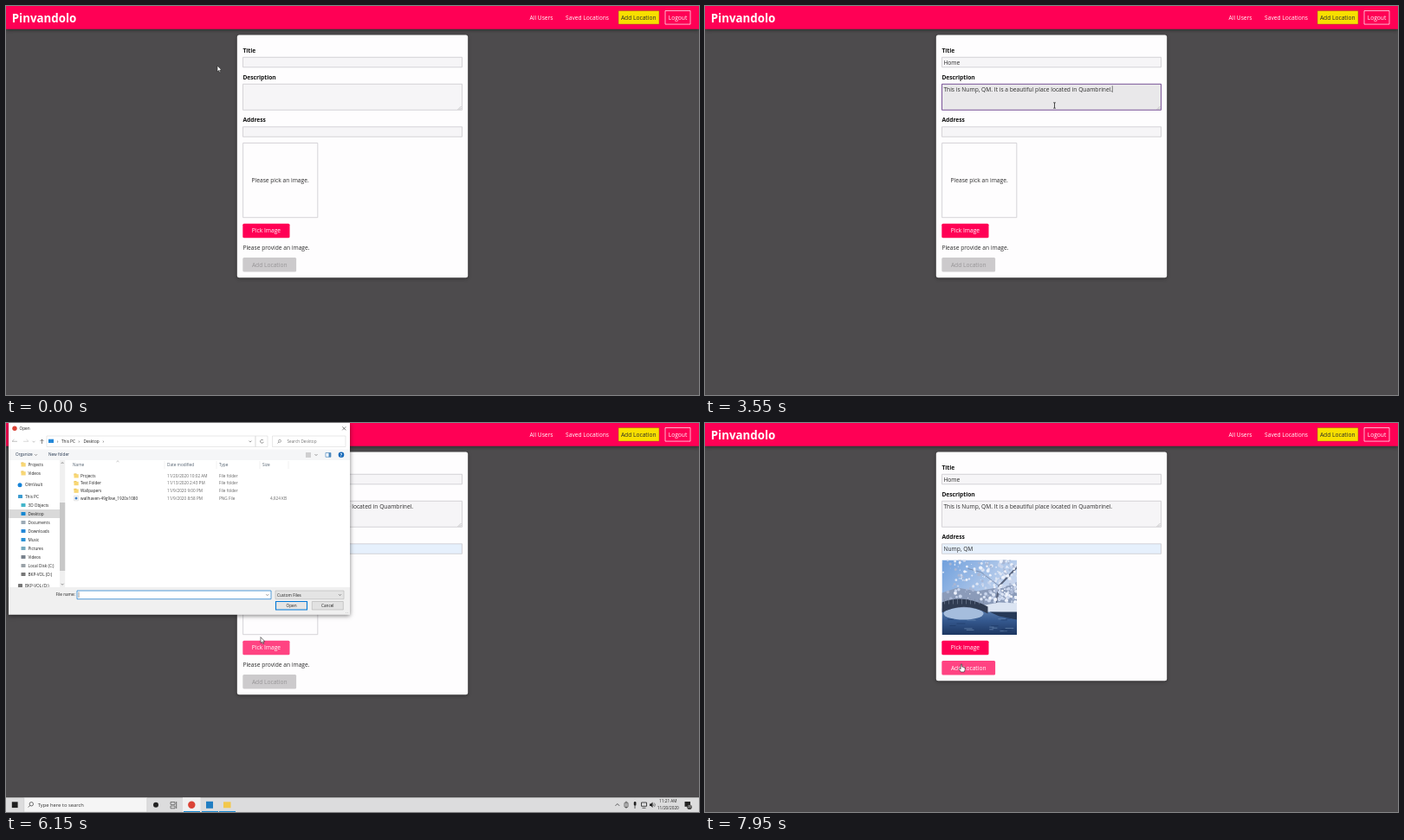
An HTML page with a canvas for the animation above (8000 ms loop, 800 by 450 pixels).

```html
<!DOCTYPE html>
<html lang="en">
<head>
<meta charset="utf-8">
<title>Add location form</title>
<style>
html, body { margin: 0; width: 100%; height: 100%; overflow: hidden; background: #4d4b4d; }
canvas { display: block; width: 100vw; height: 100vh; }
</style>
</head>
<body>
<canvas id="stage" width="800" height="450"></canvas>
<script>
const ctx = document.getElementById('stage').getContext('2d');
const LOOP = 8000, PINK = '#ff0055', HOVER = '#ff4382', INK = '#2b2b2b';
const PLACE = 'Nump, QM';
const STORY = `This is ${PLACE}. It is a beautiful place located in Quambrinel.`;

// Moments of the scene, in ms
const AT = {
  titleFocus: 850, suggest: 1050, storyFocus: 2700, placeFocus: 4300, autofill: 4600,
  pick: 5550, taskbar: 5700, open: 5850, loaded: 6050, rowHover: 6550, rowSelect: 6700,
  close: 7250, closed: 7400, addHover: 7900
};

// Pointer path: time, x, y
const PATH = [
  [50, 244, 69], [650, 329.5, 63], [2200, 329.5, 63], [2550, 403.5, 115], [4000, 403.5, 115],
  [4280, 366, 146], [4520, 366, 146], [4700, 353.5, 163], [4850, 353.5, 163], [5400, 304, 261],
  [6080, 304, 261], [6500, 172.5, 85.5], [7400, 172.5, 85.5], [7850, 296, 279]
];
const FIELDS = { title: [273, 59, 254, 12.5], story: [273, 90, 254, 31], place: [273, 139.5, 254, 12.5] };

const clamp = v => Math.max(0, Math.min(1, v));
const progress = (t, a, b) => clamp((t - a) / (b - a));
const ease = p => p * p * (3 - 2 * p);
const mix = (a, b, p) => a + (b - a) * p;
const inside = ([x, y, w, h], p) => p.x >= x && p.x <= x + w && p.y >= y && p.y <= y + h;

function text(str, x, y, size = 6.67, color = INK, align = 'left', weight = 400) {
  ctx.font = `${weight} ${size}px "Open Sans", sans-serif`;
  ctx.textAlign = align;
  ctx.fillStyle = color;
  ctx.fillText(str, x, y + size * 0.36);
}
function rect(x, y, w, h, fill, stroke, radius = 0, line = 0.8) {
  ctx.beginPath();
  ctx.roundRect(x, y, w, h, radius);
  if (fill) { ctx.fillStyle = fill; ctx.fill(); }
  if (stroke) { ctx.strokeStyle = stroke; ctx.lineWidth = line; ctx.stroke(); }
}
function dot(x, y, r, fill) {
  ctx.beginPath();
  ctx.arc(x, y, r, 0, 7);
  ctx.fillStyle = fill;
  ctx.fill();
}
function line(points, color, width = 0.7) {
  ctx.beginPath();
  points.forEach(([x, y]) => ctx.lineTo(x, y));
  ctx.strokeStyle = color;
  ctx.lineWidth = width;
  ctx.stroke();
}
function shape(points, fill) {
  ctx.beginPath();
  points.forEach(([x, y]) => ctx.lineTo(x, y));
  ctx.closePath();
  ctx.fillStyle = fill;
  ctx.fill();
}
const chevron = (x, y, color = '#555') => line([[x - 1.5, y - 0.7], [x, y + 0.8], [x + 1.5, y - 0.7]], color, 0.6);
function withShadow(blur, offset, color, draw) {
  ctx.save();
  ctx.shadowBlur = blur;
  ctx.shadowOffsetY = offset;
  ctx.shadowColor = color;
  draw();
  ctx.restore();
}

function pointerAt(t) {
  let i = PATH.findIndex(k => k[0] > t);
  if (i === 0) return { x: PATH[0][1], y: PATH[0][2] };
  if (i < 0) i = PATH.length - 1;
  const [t0, x0, y0] = PATH[i - 1], [t1, x1, y1] = PATH[i];
  const p = ease(progress(t, t0, t1));
  return { x: mix(x0, x1, p), y: mix(y0, y1, p) };
}

function header() {
  withShadow(4, 1, 'rgba(0,0,0,.45)', () => rect(0, 0, 800, 26.7, PINK));
  text('Pinvandolo', 6.7, 14, 13.33, '#fff', 'left', 700);
  text('All Users', 618, 13.5, 6.67, '#fff', 'center');
  text('Saved Locations', 671, 13.5, 6.67, '#fff', 'center');
  rect(707, 5.5, 47, 15.6, '#f8df00', '#a34a1c', 0, 0.5);
  text('Add Location', 730.2, 13.5, 6.67, '#292929', 'center');
  rect(761, 5.5, 29, 15.6, null, '#fff', 0, 0.7);
  text('Logout', 775.5, 13.5, 6.67, '#fff', 'center');
}

function field(box, value, focused, lastChange, t, filled) {
  const [x, y, w, h] = box;
  const fill = filled ? '#e6f0fc' : focused ? '#e9e8ea' : '#f6f5f7';
  rect(x + 0.5, y + 0.3, w - 1, h - 1, fill, focused ? '#5b2b80' : '#ccc9ce');
  text(value, x + 2.4, y + 6.2);
  if (focused && (t - lastChange) % 1000 < 500) {
    const end = x + 2.6 + ctx.measureText(value).width;
    line([[end, y + 2.3], [end, y + 10]], '#333', 0.6);
  }
}

function button(label, y, w, fill, color = '#fff') {
  rect(273.3, y, w, 16.5, fill, null, 1.5);
  text(label, 273.3 + w / 2, y + 8.3, 6.67, color, 'center');
}

function photo() {
  ctx.save();
  ctx.beginPath();
  ctx.rect(273.5, 158.5, 86.5, 86.5);
  ctx.clip();
  ctx.translate(273.5, 158.5);
  const sky = ctx.createLinearGradient(0, 0, 60, 50);
  sky.addColorStop(0, '#6f9fdc');
  sky.addColorStop(1, '#c5d5ee');
  rect(0, 0, 87, 60, sky);
  shape([[0, 38], [18, 32], [40, 36], [87, 28], [87, 60], [0, 60]], '#8b9bb9');
  line([[87, 8], [66, 30], [61, 58]], '#59647d', 2);
  line([[66, 30], [45, 14], [30, 10]], '#7785a3', 0.8);
  let seed = 7;
  const random = () => (seed = seed * 16807 % 2147483647) / 2147483647;
  for (let i = 0; i < 240; i++) {
    const reach = Math.sqrt(random());
    const shade = ['#eef2fb', '#c9d5ec', '#a9b7d4', '#dde5f4'][i % 4];
    dot(87 - (1 - reach) * 90 + random() * 14 - 9, random() * 49, 0.5 + random() * 1.7, shade);
  }
  const water = ctx.createLinearGradient(0, 56, 0, 87);
  water.addColorStop(0, '#5f82b1');
  water.addColorStop(0.45, '#35598f');
  water.addColorStop(1, '#1c355f');
  rect(0, 56, 87, 31, water);
  shape([[45, 53], [66, 49], [87, 50], [87, 61], [52, 60]], '#dbe4f2');
  shape([[55, 60], [87, 60], [87, 69], [66, 65]], '#263957');
  ctx.beginPath();
  ctx.ellipse(25, 62, 23, 7, 0, 0, 7);
  ctx.fillStyle = '#a5bddd';
  ctx.fill();
  ctx.beginPath();
  ctx.moveTo(0, 49);
  ctx.quadraticCurveTo(25, 39, 53, 54);
  ctx.lineTo(53, 62);
  ctx.quadraticCurveTo(26, 47, 0, 61);
  ctx.fillStyle = '#303c52';
  ctx.fill();
  for (let x = 3; x < 50; x += 5) line([[x, 45], [x, 51]], '#79869d', 0.6);
  for (let i = 0; i < 18; i++) {
    const x = random() * 78, y = 67 + random() * 18;
    line([[x, y], [x + 4 + random() * 7, y]], i % 2 ? '#7895bd' : '#1d3864', 0.6);
  }
  ctx.restore();
}

function suggestions(items) {
  withShadow(3, 1, 'rgba(0,0,0,.4)', () => rect(273.3, 71.8, 80, 6.5 + items.length * 15, '#fff'));
  items.forEach((item, i) => text(item, 278.3, 82.8 + i * 15, 5));
}

function form(t, pointer) {
  const hasImage = t >= AT.closed;
  withShadow(4, 1, 'rgba(0,0,0,.4)', () =>
    rect(266.8, 33.6, 266.4, hasImage ? 264.6 : 280.6, '#fefdfe', null, 2.5));
  text('Title', 273.4, 51.2, 6.67, '#111', 'left', 700);
  text('Description', 273.4, 82.6, 6.67, '#111', 'left', 700);
  text('Address', 273.4, 132, 6.67, '#111', 'left', 700);

  const titleKeys = [1400, 1650, 1750, 1850].filter(k => t >= k);
  field(FIELDS.title, 'Home'.slice(0, titleKeys.length), t >= AT.titleFocus && t < AT.storyFocus,
    titleKeys.at(-1) ?? AT.titleFocus, t);

  const storyLength = Math.floor(7 * progress(t, 2750, 3000) + (STORY.length - 7) * progress(t, 3150, 3550));
  field(FIELDS.story, STORY.slice(0, storyLength), t >= AT.storyFocus && t < AT.placeFocus,
    Math.min(t, 3550), t);
  for (const d of [2, 4]) line([[525.5 - d, 120], [525.5, 120 - d]], '#999', 0.5);

  const placeLength = Math.floor(PLACE.length * progress(t, 4350, AT.autofill));
  field(FIELDS.place, PLACE.slice(0, placeLength), t >= AT.placeFocus && t < AT.pick,
    Math.min(t, AT.autofill), t, t >= AT.autofill);

  if (hasImage) photo();
  else {
    rect(273.6, 158.5, 86.2, 86.2, null, '#ccc9ce');
    text('Please pick an image.', 316.6, 202, 6.67, INK, 'center');
    text('Please provide an image.', 273.4, 279.8);
  }
  const overPick = inside([273, 251.5, 54, 16.5], pointer);
  const picking = t >= AT.pick && t < AT.closed;
  button('Pick Image', 251.7, 54.2, overPick || picking ? HOVER : PINK);
  if (hasImage) button('Add Location', 275.1, 61.8, t >= AT.addHover ? HOVER : PINK);
  else button('Add Location', 291, 61.8, '#cccacc', '#979597');

  if (t >= AT.suggest && t < AT.storyFocus) {
    suggestions(t < 1400
      ? ['Home', 'Apples', '123', 'Harrow Crest Building', 'Banana', 'Test']
      : ['Home', 'Home 2']);
  }
}

const small = (str, x, y, color = '#222', align) => text(str, x, y, 4.7, color, align);
function folder(x, y) {
  rect(x - 2.5, y - 2.5, 3, 2, '#e5b740');
  rect(x - 2.5, y - 1.8, 5.2, 4.3, '#f8d775');
}

function sidebar() {
  ctx.save();
  ctx.beginPath();
  ctx.rect(3, 43, 66, 147);
  ctx.clip();
  rect(3, 100, 59, 10, '#d9d9d9');
  const entries = [
    ['Projects', 48, 25.5, 'folder'], ['Videos', 58, 25.5, 'folder'],
    ['OlmVault', 71.8, 22, '#1683d8'], ['This PC', 85, 22, '#3b9bd0'],
    ['3D Objects', 95, 25.5, '#43b5ca'], ['Desktop', 105, 25.5, '#1688d1'],
    ['Documents', 115, 25.5, '#9caab5'], ['Downloads', 125, 25.5, '#2488d8'],
    ['Music', 135, 25.5, '#2b91d5'], ['Pictures', 145, 25.5, '#75aabf'],
    ['Videos', 155, 25.5, '#78818c'], ['Local Disk (C:)', 165, 25.5, '#9aa2a8'],
    ['BKP-VOL (D:)', 175, 25.5, '#777'], ['BKP-VOL (D:)', 188, 22, '#777']
  ];
  for (const [label, y, x, icon] of entries) {
    if (icon === 'folder') folder(x - 5.5, y);
    else if (label === 'OlmVault') dot(x - 6, y, 2.5, icon);
    else rect(x - 8, y - 2, 5, 4, icon, null, 0.6);
    small(label, x, y);
  }
  rect(62, 43, 6.2, 147, '#f0f0f0');
  rect(62, 92, 6.2, 79, '#c8c8c8');
  line([[63.7, 47], [65.1, 45.5], [66.5, 47]], '#555', 0.6);
  chevron(65.1, 186.5);
  ctx.restore();
}

function fileList(t) {
  [['Name', 77], ['Date modified', 186], ['Type', 246], ['Size', 296]].forEach(([s, x]) => small(s, x, 48.5, '#53616f'));
  [183, 243, 293, 326].forEach(x => line([[x, 44], [x, 53]], '#e2e2e2', 0.5));
  line([[127.5, 45], [129, 43.7], [130.5, 45]], '#888', 0.5);
  if (t >= AT.rowHover) {
    const selected = t >= AT.rowSelect;
    rect(76, 82.7, 249.5, 8.5, selected ? '#cce8ff' : '#e5f3ff', selected ? '#80bde8' : null, 0, 0.6);
  }
  const rows = [
    ['Projects', '11/20/2020 10:02 AM'], ['Test Folder', '11/13/2020 2:43 PM'],
    ['Wallpapers', '11/9/2020 9:00 PM'], ['wallhaven-49g9xw_1920x1080', '11/9/2020 8:58 PM']
  ];
  rows.forEach(([name, date], i) => {
    const y = 61 + i * 8.67, isFile = i === 3;
    if (isFile) {
      rect(78.7, y - 2.8, 4.6, 5.6, '#fff', '#bbb', 0, 0.4);
      dot(81, y, 1.5, '#3f7fc8');
    } else folder(81, y);
    small(name, 86, y);
    small(date, 186, y, '#666');
    small(isFile ? 'PNG File' : 'File folder', 246, y, '#666');
    if (isFile) small('4,924 KB', 324, y, '#666', 'right');
  });
}

function addressBar() {
  line([[13, 21.3], [7, 21.3], [9.5, 19]], '#aaa');
  line([[20, 21.3], [26, 21.3], [23.5, 19]], '#ccc');
  chevron(32, 21.5, '#999');
  line([[41.5, 24], [41.5, 19], [39.5, 21]], '#555');
  line([[41.5, 19], [43.5, 21]], '#555');
  rect(47, 15, 241, 12.5, '#fff', '#d9d9d9', 0, 0.6);
  rect(49, 18.7, 6, 4.3, '#2488d8');
  small('›', 59, 21.3);
  small('This PC', 64, 21.3);
  small('›', 83.5, 21.3);
  small('Desktop', 89.5, 21.3);
  small('›', 111.5, 21.3);
  chevron(282, 21.3);
  rect(288, 15, 14, 12.5, null, '#d9d9d9', 0, 0.6);
  ctx.beginPath();
  ctx.arc(295.5, 21.3, 1.9, 0.3, 5.6);
  ctx.strokeStyle = '#555';
  ctx.stroke();
  rect(307.5, 15, 84.5, 12.5, '#fff', '#d9d9d9', 0, 0.6);
  ctx.beginPath();
  ctx.arc(316, 20.8, 1.5, 0, 7);
  ctx.strokeStyle = '#777';
  ctx.stroke();
  line([[315, 22], [313.5, 23.5]], '#777');
  small('Search Desktop', 324.5, 21.3, '#777');
  small('Organize', 11, 36.8, '#24364e');
  chevron(34.5, 36.8);
  small('New folder', 49, 36.8, '#24364e');
  for (const y of [35, 37, 39]) line([[346, y], [352, y]], '#888', 0.7);
  chevron(358, 36.8);
}

function dialog(t) {
  const shown = progress(t, AT.open, AT.loaded) * (1 - progress(t, AT.close, AT.closed));
  if (!shown) return;
  const loaded = t >= AT.loaded, selected = t >= AT.rowSelect;
  const scale = mix(0.96, 1, shown);
  ctx.save();
  ctx.globalAlpha = shown;
  ctx.translate(200, 110.5);
  ctx.scale(scale, scale);
  ctx.translate(-200, -110.5);
  withShadow(5, 1, 'rgba(0,0,0,.5)', () => rect(3, 0, 394, 221.5, '#fff'));
  dot(10, 6.3, 2.7, '#db4437');
  small('Open', 15.5, 6.5);
  line([[388.3, 4.3], [392.3, 8.3]], '#333', 0.6);
  line([[392.3, 4.3], [388.3, 8.3]], '#333', 0.6);
  rect(3, 30.5, 394, 12.5, '#f5f6f7');
  if (loaded) addressBar();
  rect(369, 34.5, 6, 4.8, '#fff', '#4c88bd', 0, 0.7);
  rect(372.5, 34.5, 2.5, 4.8, '#4c88bd');
  dot(387, 36.8, 3.3, '#1669b8');
  text('?', 387, 36.8, 5, '#fff', 'center', 700);
  sidebar();
  fileList(t);

  rect(3, 190, 394, 31.5, '#f0f0f0');
  small('File name:', 57.5, 198.8);
  rect(82, 194, 224, 9.7, '#fff', '#2a83cf', 0, 0.8);
  if (selected) small('wallhaven-49g9xw_1920x1080', 83.8, 198.9);
  else line([[84, 195.5], [84, 202]], '#333', 0.5);
  chevron(301.8, 198.8);
  rect(311, 194, 79, 9.7, '#e4e4e4', '#b5b5b5', 0, 0.6);
  small('Custom Files', 313, 198.9);
  chevron(385.5, 198.8);
  rect(311.5, 206.5, 36, 9.5, '#e5e5e5', '#0078d7', 0, 1.1);
  small('Open', 329.5, 211.4, '#222', 'center');
  rect(353.3, 206.5, 36, 9.5, loaded ? '#e2e2e2' : '#f8f8f8', loaded ? '#b0b0b0' : null, 0, 0.6);
  if (loaded) small('Cancel', 371.3, 211.4, '#222', 'center');
  for (const d of [1.5, 3.5]) dot(396 - d, 219.5, 0.4, '#aaa');
  ctx.restore();
}

function taskbar() {
  rect(0, 433.3, 800, 16.7, '#dcdcdd');
  rect(6.8, 438.3, 6.8, 6.8, '#1f1f1f');
  rect(20.8, 433.5, 142, 16.5, '#f5f5f5', '#c5c5c5', 0, 0.5);
  ctx.beginPath();
  ctx.arc(29.3, 440.8, 2.2, 0, 7);
  ctx.strokeStyle = '#333';
  ctx.lineWidth = 0.7;
  ctx.stroke();
  line([[27.7, 442.4], [25.7, 444.5]], '#333');
  text('Type here to search', 36.7, 441.8, 5.8, '#333');
  dot(173, 441.8, 3, '#222');
  for (const y of [438.5, 443]) rect(190, y, 5, 2.8, null, '#333', 0, 0.6);
  line([[196.7, 438], [196.7, 446]], '#333', 0.7);
  rect(204, 433.3, 20.5, 16.7, '#f0f0f0');
  dot(214.3, 441.8, 4.2, '#db4437');
  rect(231, 437.8, 8, 8, '#207dc2');
  rect(251, 438.3, 8.5, 7, '#f2c84b');
  for (const x of [204, 225, 245]) rect(x + 1, 449, 19, 1, '#1688d1');

  line([[703.5, 442.8], [705.8, 440.5], [708.1, 442.8]], '#222');
  rect(714, 439, 4, 5.5, null, '#333', 1, 0.7);
  line([[716, 437.5], [716, 446]], '#333', 0.6);
  rect(724.8, 438, 2.6, 4.8, '#222', null, 1.2);
  line([[726, 443], [726, 446]], '#222');
  rect(733.5, 439, 6, 4.3, null, '#222');
  line([[734.5, 445.3], [738.5, 445.3]], '#222');
  shape([[743, 440.5], [744.5, 440.5], [746.5, 438.5], [746.5, 445], [744.5, 443], [743, 443]], '#222');
  for (const r of [1.5, 3]) {
    ctx.beginPath();
    ctx.arc(746.3, 441.8, r, -0.9, 0.9);
    ctx.strokeStyle = '#222';
    ctx.lineWidth = 0.5;
    ctx.stroke();
  }
  small('11:21 AM', 764.3, 437.8, '#222', 'center');
  small('11/20/2020', 764.3, 445.6, '#222', 'center');
  rect(783.5, 438, 6.5, 5.8, '#222');
  dot(789, 444.3, 2.8, '#444');
  text('20', 789, 444.3, 3, '#fff', 'center');
}

function cursor(t, pointer) {
  const { x, y } = pointer;
  const dialogOpen = t >= AT.loaded && t < AT.closed;
  const overField = !dialogOpen && Object.values(FIELDS).some(box => inside(box, pointer));
  const overButton = !dialogOpen && (inside([273, 251.5, 54, 16.5], pointer) ||
    (t >= AT.closed && inside([273, 275, 62, 17], pointer)));
  ctx.save();
  ctx.translate(x, y);
  if (overField) {
    line([[0, -3], [0, 3]], '#222', 0.8);
    for (const end of [-3.2, 3.2]) line([[-1.4, end], [1.4, end]], '#222', 0.7);
  } else {
    const outline = overButton
      ? [[-0.7, 0], [0.6, 0], [0.8, 3], [4, 3.8], [4.2, 6.5], [3.2, 9], [-0.7, 9], [-3, 5.4], [-2.2, 4.6], [-0.8, 5.6]]
      : [[0, 0], [0, 7], [1.6, 5.6], [2.7, 8], [3.8, 7.5], [2.7, 5.2], [4.8, 5]];
    shape(outline, '#fff');
    ctx.strokeStyle = '#222';
    ctx.lineWidth = 0.6;
    ctx.stroke();
  }
  ctx.restore();
}

function render(now) {
  const t = now % LOOP, pointer = pointerAt(t);
  rect(0, 0, 800, 450, '#4d4b4d');
  form(t, pointer);
  header();
  if (t >= AT.taskbar && t < AT.closed) taskbar();
  dialog(t);
  cursor(t, pointer);
  requestAnimationFrame(render);
}
requestAnimationFrame(render);
</script>
</body>
</html>
```
